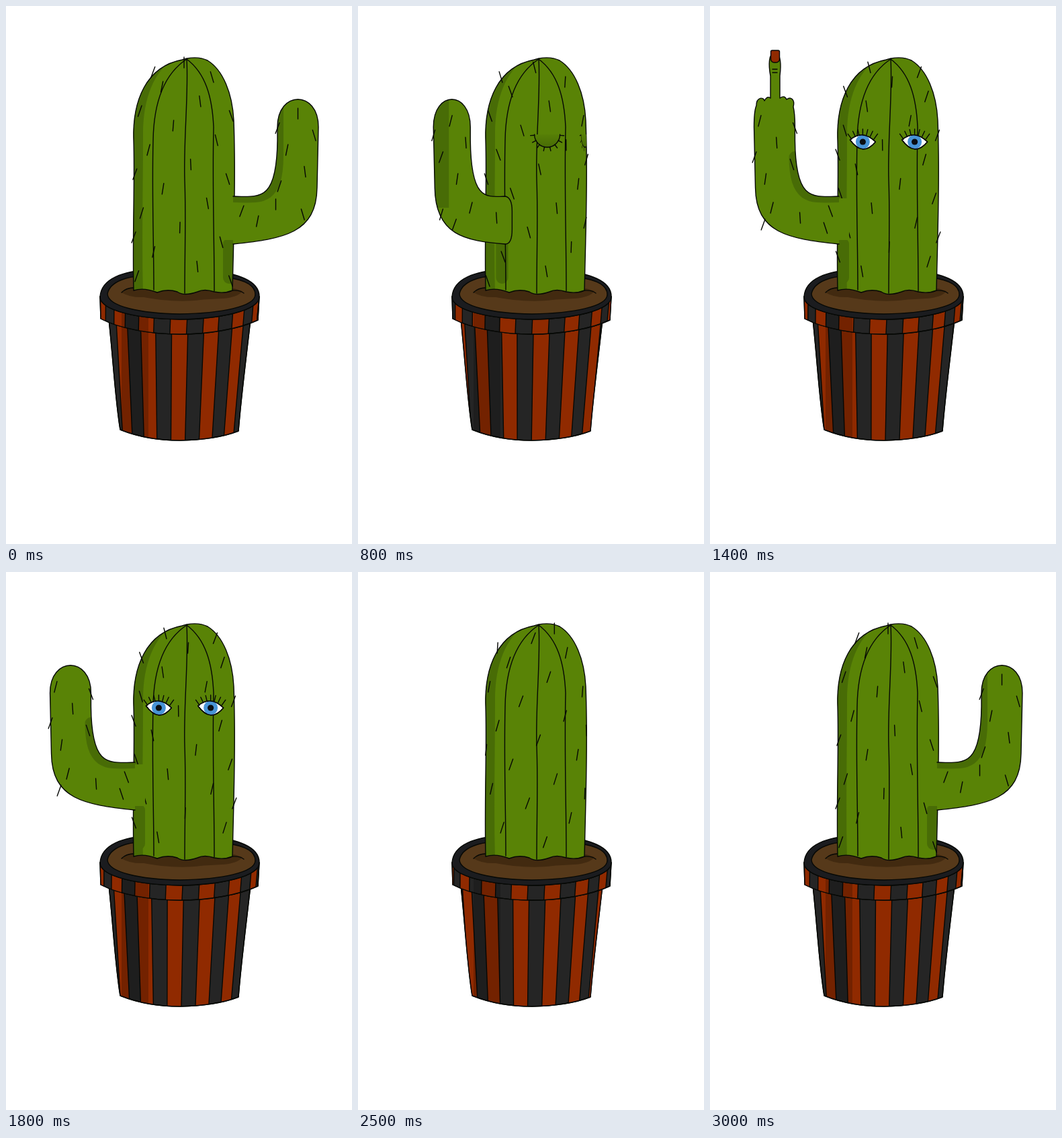
These frames come from a looping animation (515 px wide and 800 px high, 3.1 s). An HTML page with a canvas:

```html
<!DOCTYPE html>
<html lang="en">
<head>
<meta charset="utf-8">
<title>Turning cactus</title>
<style>
html, body { margin: 0; width: 100%; height: 100%; overflow: hidden; background: #fff; }
canvas { display: block; }
</style>
</head>
<body>
<canvas id="stage" width="515" height="800"></canvas>
<script>
const ctx = document.getElementById('stage').getContext('2d');
const LOOP = 3100, STEP = 100, CX = 265, RAD = Math.PI / 180, FRONT = 184, GOLDEN = 137.508;
const GREEN = '#598306', GREEN_DARK = '#486c06', RED = '#902a00', BLACK = '#252525',
      RIM = '#1b1c1f', SOIL = '#56391a', SOIL_DARK = '#422a10', INK = '#060805';

// [time, value] keys, linear in between
const TURN = [[0, 0], [400, 69], [800, 141], [1100, FRONT], [1900, FRONT], [3000, 360]];
const FINGER = [[1100, 0], [1300, 1], [1600, 1], [1800, 0]];

const trunk = new Path2D(`M190 423 C188 340 192 260 190 200 C188 140 209 90 262 80 L269 78
  C280 76 292 77 300 81 C323 95 337 130 339 170 C342 250 339 340 337 423
  Q325 428 310 425 Q295 420 285 425 Q265 432 255 425 Q240 420 225 426 Q205 418 190 423Z`);
const trunkShade = new Path2D(`M180 430 V70 H262 C225 88 204 130 204 190
  C204 270 202 350 204 430Z`);
const ridges = new Path2D(`M269 79 C240 98 220 135 219 200 C217 280 220 350 220 422
  M269 79 C272 130 264 200 266 260 C268 310 266 370 266 427
  M269 79 C297 100 307 135 309 180 C307 270 310 340 310 424`);
const rimTop = new Path2D(`M140 432 C142 405 175 394 215 392 L300 392 C345 398 377 408 377 432
  C377 453 320 465 259 466 C200 465 140 454 140 432Z`);
const rimSide = new Path2D(`M140 432 C140 454 200 465 259 466 C320 465 377 453 377 432
  L375 467 C345 481 300 488 259 488 C215 488 170 480 141 465Z`);
const soil = new Path2D(`M151 428 C155 408 185 402 200 402 L330 404 C360 408 371 418 371 429
  C371 447 320 457 259 458 C200 457 152 447 151 428Z`);
const soilDark = new Path2D(`M172 426 Q182 416 200 418 L340 420 L352 424
  C340 438 315 434 290 437 C260 441 225 437 205 433 Q185 434 172 426Z`);
const potSide = new Path2D(`M153 466 C159 520 163 590 170 630 Q210 646 259 646
  Q312 645 346 632 C350 580 358 520 364 466Z`);

function keyed(keys, t) {
  if (t <= keys[0][0]) return keys[0][1];
  for (let i = 1; i < keys.length; i++) {
    const [t0, a] = keys[i - 1], [t1, b] = keys[i];
    if (t <= t1) return a + (b - a) * (t - t0) / (t1 - t0);
  }
  return keys[keys.length - 1][1];
}

function shape(path, fill) {
  ctx.fillStyle = fill;
  ctx.fill(path);
  ctx.stroke(path);
}

function clipped(path, draw) {
  ctx.save();
  ctx.clip(path);
  draw();
  ctx.restore();
}

function line(x0, y0, x1, y1) {
  ctx.beginPath();
  ctx.moveTo(x0, y0);
  ctx.lineTo(x1, y1);
  ctx.stroke();
}

function spine(x, y, lean) {
  line(x - lean, y - 8, x + lean, y + 8);
}

// Spines wind round a column at the golden angle; place(sine, y) gives x
function spiral(count, top, bottom, turn, place) {
  for (let k = 0; k < count; k++) {
    const a = (k * GOLDEN - turn) * RAD, y = top + (bottom - top) * k / (count - 1);
    if (Math.cos(a) > -.04) spine(place(Math.sin(a), y), y, 3 * Math.sin(k * 2.4));
  }
}

// The pot's face is flatter than a full cylinder, so bands stay wide at the sides
function stripes(angle, top, bottom, topR, bottomR) {
  const edge = (deg, r) => r * Math.sin(.8 * deg * RAD);
  for (let c = -(angle % 30) - 90; c <= 120; c += 30) {
    const [a, b] = [c - 7.5, c + 7.5];
    const band = new Path2D();
    band.moveTo(259 + edge(a, topR), top);
    band.lineTo(256 + edge(a, bottomR), bottom);
    band.lineTo(256 + edge(b, bottomR), bottom);
    band.lineTo(259 + edge(b, topR), top);
    shape(band, RED);
  }
  ctx.fillStyle = 'rgba(0,0,0,.2)';
  ctx.fillRect(172, top, 40, bottom - top);
}

function drawPot(angle) {
  shape(potSide, BLACK);
  clipped(potSide, () => stripes(angle, 460, 650, 118, 101));
  ctx.stroke(potSide);
  shape(rimSide, BLACK);
  clipped(rimSide, () => stripes(angle, 425, 492, 121, 118));
  ctx.stroke(rimSide);
  shape(rimTop, RIM);
  shape(soil, SOIL);
  ctx.fillStyle = SOIL_DARK;
  ctx.fill(soilDark);
  ctx.stroke(new Path2D('M172 426 Q179 419 190 419 M336 423 Q348 422 354 427'));
}

function halfWidth(y) {
  const rise = Math.min(1, Math.max(0, (190 - y) / 113));
  return 75 * Math.sqrt(1 - rise ** 2.3);
}

function openEye() {
  const eye = new Path2D('M-19 -2 Q0 -18 19 1 Q0 24 -19 -2Z');
  shape(eye, '#fff');
  clipped(eye, () => {
    for (const [r, color] of [[10.5, '#4793d6'], [4.6, '#0a0d12']]) {
      ctx.fillStyle = color;
      ctx.beginPath();
      ctx.arc(0, 1, r, 0, 7);
      ctx.fill();
    }
  });
  ctx.stroke(eye);
  for (let k = -3; k <= 3; k++) {
    const y = -10 + k * k * .8;
    line(k * 5.5, y, k * 7.4, y - 8);
  }
}

function closedEye() {
  const lid = new Path2D();
  lid.ellipse(0, -10, 19, 19, 0, 0, Math.PI);
  const g = ctx.createLinearGradient(0, -14, 0, 9);
  g.addColorStop(0, GREEN);
  g.addColorStop(1, GREEN_DARK);
  ctx.fillStyle = g;
  ctx.fill(lid);
  ctx.stroke(lid);
  for (let k = 0; k < 8; k++) {
    const a = (4 + k * 24.6) * RAD, c = Math.cos(a), s = Math.sin(a);
    line(19 * c, 19 * s - 10, 25 * c, 25 * s - 10);
  }
}

function drawEyes(angle, t) {
  if (angle > 270) return;
  for (const side of [-31, 31]) {
    const a = (side + FRONT - angle) * RAD;
    if (Math.cos(a) < .2) continue;
    ctx.save();
    ctx.translate(CX + 1 + 75 * Math.sin(a), 201);
    ctx.scale(Math.min(1, Math.cos(a) * 1.17), 1);
    (t >= 1000 ? openEye : closedEye)();
    ctx.restore();
  }
}

// Arm geometry measured outward from the trunk's axis
function armPose(angle) {
  const c = Math.cos(angle * RAD), s = Math.sin(angle * RAD), reach = Math.abs(c);
  const mid = 169.5 * reach ** 1.2, half = 17 + 13.5 * reach, joined = Math.abs(s) < .2;
  return { dir: c < 0 ? -1 : 1, s, mid, half, joined, inner: mid - half, outer: mid + half,
    base: joined ? 73 : 75 * reach - 36 * Math.abs(s) };
}

function elbow(p, { inner: i, base: e }, end) {
  p.bezierCurveTo(i - 1, 290, i - .38 * (i - e), 284, end, 283);
}

function handTop(p, mid, inner, outer, finger) {
  const tip = 139 - 69 * finger, neck = 137 - 33 * finger, bend = neck - 16 * finger;
  p.quadraticCurveTo(outer, 156, mid + 27, 148);
  p.bezierCurveTo(mid + 27, 135, mid + 16, 135, mid + 15, 141);
  p.quadraticCurveTo(mid + 11, 133, mid + 6, 137);
  p.lineTo(mid + 6, neck);
  p.bezierCurveTo(mid + 9, bend, mid + 9, tip, mid, tip);
  p.bezierCurveTo(mid - 10, tip, mid - 10, bend, mid - 8, neck);
  p.lineTo(mid - 8, 137);
  p.quadraticCurveTo(mid - 15, 132, mid - 18, 139);
  p.bezierCurveTo(mid - 24, 134, mid - 31, 139, mid - 28, 150);
  p.quadraticCurveTo(inner, 160, inner, 180);
}

function armPath(pose, finger) {
  const { s, mid, inner: i, outer: o, base: e, joined } = pose;
  const round = joined ? 0 : 16 * Math.abs(s), drop = joined ? 0 : 5 * Math.abs(s);
  const p = new Path2D();
  p.moveTo(e + round, 354);
  p.bezierCurveTo(e + .6 * (o - e), 346 + drop, o - 3, 338 + drop, o - 2, 270);
  p.lineTo(o, 180);
  if (finger > 0) handTop(p, mid, i, o, finger);
  else p.bezierCurveTo(o, 125, i, 125, i, 180);
  p.lineTo(i, 200);
  elbow(p, pose, e + round);
  if (!joined) {
    p.quadraticCurveTo(e, 285, e, 305);
    p.lineTo(e, 332);
    p.quadraticCurveTo(e, 354, e + round, 354);
    p.closePath();
  }
  return p;
}

function shadeArm(pose, angle) {
  const { dir, inner, outer, base, joined, s } = pose;
  ctx.strokeStyle = ctx.fillStyle = GREEN_DARK;
  if (joined || s < 0) {
    ctx.lineWidth = 18;
    ctx.beginPath();
    ctx.moveTo(inner, dir > 0 ? 150 : 225);
    ctx.lineTo(inner, 225);
    elbow(ctx, pose, base);
    ctx.stroke();
  } else if (angle < 100) {
    const g = ctx.createLinearGradient(0, 200, 0, 350);
    g.addColorStop(0, GREEN_DARK);
    g.addColorStop(1, GREEN);
    ctx.fillStyle = g;
    ctx.fillRect(inner + 8, 130, outer - inner, 225);
  } else {
    ctx.fillRect(outer - 23, 130, 30, 170);
  }
}

function drawFinger(mid, finger) {
  const tip = 139 - 69 * finger;
  const nail = new Path2D();
  nail.roundRect(mid - 7.5, tip - 4, 13, 18 * finger, [2, 2, 5, 5]);
  shape(nail, RED);
  if (finger < .8) return;
  for (const y of [tip + 24, tip + 29]) line(mid - 4, y, mid + 3, y);
}

function drawArm(angle, finger) {
  const pose = armPose(angle);
  const { dir, mid, half, outer, base, joined } = pose;
  const path = armPath(pose, finger);
  ctx.save();
  ctx.translate(CX, 0);
  ctx.scale(dir, 1);
  ctx.fillStyle = GREEN;
  ctx.fill(path);
  if (joined) ctx.fillRect(58, 286, 20, 62);
  clipped(path, () => shadeArm(pose, angle));
  ctx.stroke(path);
  if (finger > 0) drawFinger(mid, finger);
  spiral(11, 160, 268, angle, (sine, y) => mid + dir * half * sine);
  spiral(8, 295, 330, angle, (sine, y) => (base + outer) / 2 + dir * .4 * (outer - base) * sine);
  ctx.restore();
}

function drawTrunk(angle, t) {
  const { dir, base, s } = armPose(angle);
  ctx.fillStyle = GREEN;
  ctx.fill(trunk);
  clipped(trunk, () => {
    ctx.fillStyle = GREEN_DARK;
    ctx.fill(trunkShade);
    if (s > -.15) {
      const x = CX + dir * (Math.min(base + 6, 58) + 9);
      ctx.beginPath();
      ctx.roundRect(x - 9, 345, 18, 68, 9);
      ctx.fill();
    }
  });
  ctx.stroke(ridges);
  ctx.stroke(trunk);
  clipped(trunk, () => drawEyes(angle, t));
  spiral(46, 84, 409, angle, (sine, y) => CX + halfWidth(y) * sine);
}

function draw(t) {
  const angle = keyed(TURN, t), finger = keyed(FINGER, t);
  const behind = Math.sin(angle * RAD) < -.15;
  ctx.fillStyle = '#fff';
  ctx.fillRect(0, 0, 515, 800);
  ctx.strokeStyle = INK;
  ctx.lineWidth = 1.4;
  ctx.lineCap = ctx.lineJoin = 'round';
  drawPot(angle);
  if (behind) drawArm(angle, finger);
  drawTrunk(angle, t);
  if (!behind) drawArm(angle, finger);
}

const start = performance.now();
function tick() {
  const t = (performance.now() - start) % LOOP;
  draw(Math.floor(t / STEP) * STEP);
  requestAnimationFrame(tick);
}
tick();
</script>
</body>
</html>
```
